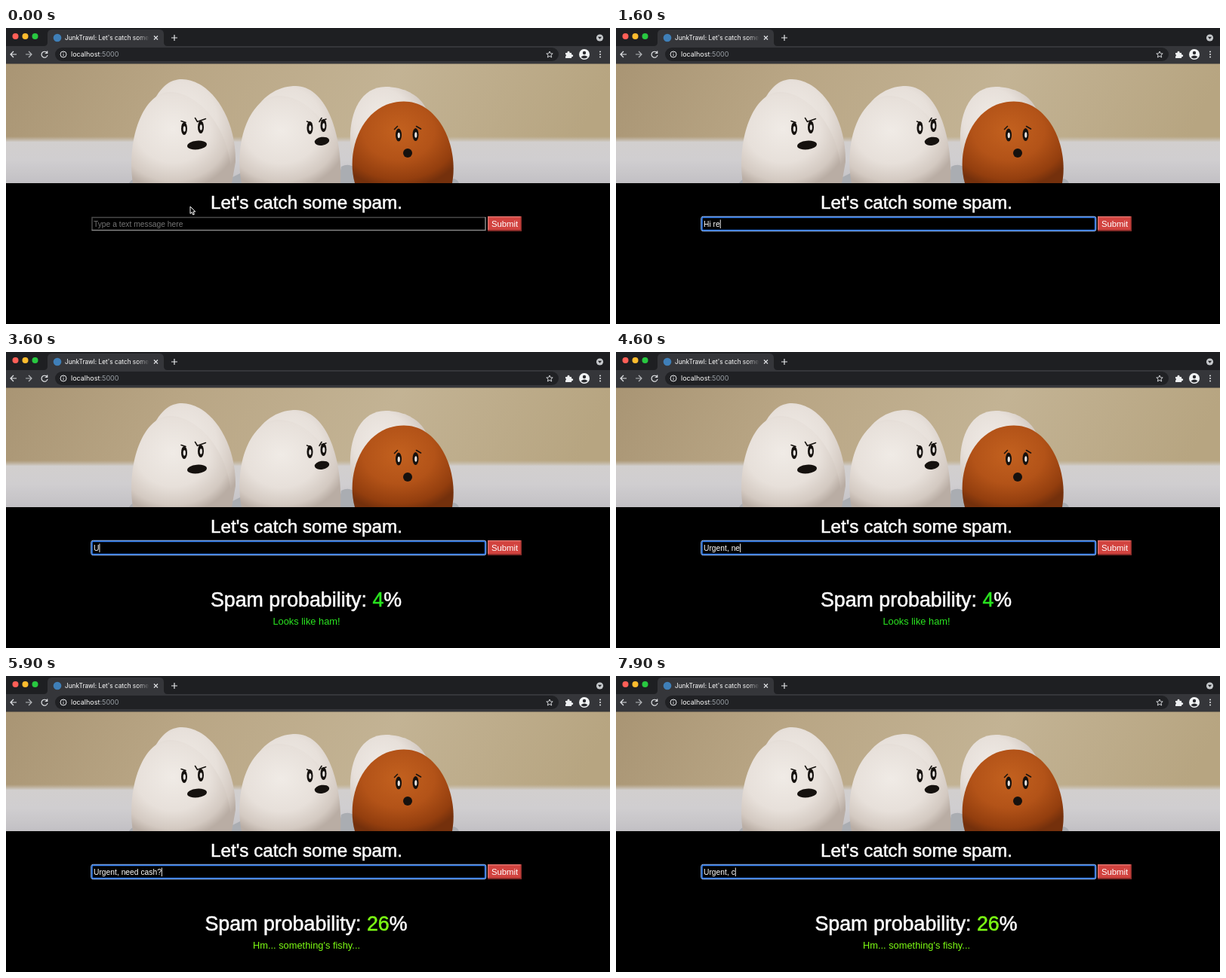
An HTML page that plays this animation: 800x393 px, repeating every 8 s.

```html
<!DOCTYPE html>
<html lang="en">
<head>
<meta charset="utf-8">
<title>Spam check</title>
<style>
  html, body { margin: 0; width: 100%; height: 100%; overflow: hidden; background: #000; }
  svg { display: block; width: 800px; height: 393px; }
  text { font-family: "Liberation Sans", Arial, sans-serif; fill: #fff; white-space: pre; }
  .ui { font-family: Inter, Roboto, sans-serif; }
  .mid { text-anchor: middle; }
  .head { stroke: #fff; stroke-width: .55; }
  .field { font-size: 10.3px; }
  .icon { fill: none; stroke: #e3e5e8; stroke-width: 1.2; }
  .brow { fill: none; stroke: #17130f; stroke-width: 1.5; stroke-linecap: round; }
</style>
</head>
<body>
<svg viewBox="0 0 800 393">
  <defs>
    <linearGradient id="wall" x1="0" x2="1" y1="0" y2=".1">
      <stop stop-color="#a99574"/><stop offset=".3" stop-color="#b9a685"/>
      <stop offset=".65" stop-color="#c3b394"/><stop offset="1" stop-color="#b7a581"/>
    </linearGradient>
    <linearGradient id="table" x2="0" y2="1">
      <stop stop-color="#cdc6bd" stop-opacity="0"/><stop offset=".12" stop-color="#d2cfce"/>
      <stop offset=".5" stop-color="#d0ced0"/><stop offset="1" stop-color="#c2c0c4"/>
    </linearGradient>
    <radialGradient id="white" cx=".42" cy=".4" r=".68">
      <stop stop-color="#f0ebe6"/><stop offset=".55" stop-color="#e7e0da"/>
      <stop offset=".85" stop-color="#d3c9c1"/><stop offset="1" stop-color="#b9ada4"/>
    </radialGradient>
    <radialGradient id="brown" cx=".46" cy=".36" r=".7">
      <stop stop-color="#c3611f"/><stop offset=".5" stop-color="#b35318"/>
      <stop offset=".85" stop-color="#933e0e"/><stop offset="1" stop-color="#74300c"/>
    </radialGradient>
    <linearGradient id="fade" gradientUnits="userSpaceOnUse" x1="174" x2="190">
      <stop stop-color="#fff"/><stop offset="1" stop-color="#fff" stop-opacity="0"/>
    </linearGradient>
  </defs>

  <!-- browser bar -->
  <rect width="800" height="48" fill="#1e1f22"/>
  <path d="M0 24H50Q55 24 55 19V8Q55 2 61 2H203Q209 2 209 8V19Q209 24 214 24H800V47.5H0Z" fill="#35363a"/>
  <circle cx="12.5" cy="11" r="4" fill="#ff5f57"/>
  <circle cx="25.5" cy="11" r="4" fill="#febc2e"/>
  <circle cx="38.5" cy="11" r="4" fill="#28c840"/>
  <circle cx="68" cy="13" r="5.3" fill="#3f7fb8"/>
  <text class="ui" x="78" y="16" font-size="8.25" style="fill:url(#fade)">JunkTrawl: Let's catch some</text>
  <path class="icon" d="M196 10.5l5 5m0-5l-5 5M219 13h8m-4-4v8"/>
  <circle cx="786.5" cy="13" r="4.6" fill="#c4c7ca"/>
  <path d="M784 11.8h5l-2.5 3z" fill="#202124"/>
  <path class="icon" d="M14 35H6m4-4l-4 4 4 4"/>
  <path class="icon" d="M26 35h8m-4-4l4 4-4 4" style="stroke:#b4b7ba"/>
  <path class="icon" d="M54 32.5A4 4 0 1 0 55 36M54.7 30.5v3h-3"/>
  <rect x="65" y="26" width="667" height="18" rx="9" fill="#202124"/>
  <circle class="icon" cx="76" cy="35" r="4" style="stroke-width:1"/>
  <path class="icon" d="M76 34.5v2.7M76 32.4v1" style="stroke-width:1"/>
  <text class="ui" x="86" y="38.2" font-size="9">localhost<tspan fill="#9aa0a6">:5000</tspan></text>
  <path class="icon" style="stroke-width:.9" d="M720 31l1.2 2.8 3 .2-2.3 2 .8 3-2.7-1.6-2.7 1.6.8-3-2.3-2 3-.2z"/>
  <path d="M741 33h2.5a1.6 1.6 0 1 1 3 0h2.500v2.300a1.600 1.600 0 1 1 0 3v1.700h-8v-2.300a1.500 1.500 0 0 0 0-2.800z" fill="#eef0f2"/>
  <circle cx="766" cy="35" r="7" fill="#f1f3f4"/>
  <circle cx="766" cy="33" r="2.200" fill="#2a2b2f"/>
  <path d="M761.500 38.500Q766 34.500 770.500 38.500Q766 42.500 761.500 38.500" fill="#2a2b2f"/>
  <g fill="#e3e5e8"><circle cx="787" cy="31.500" r="1"/><circle cx="787" cy="35" r="1"/><circle cx="787" cy="38.500" r="1"/></g>

  <!-- egg picture -->
  <rect y="47.500" width="800" height="159" fill="url(#wall)"/>
  <rect y="144" width="800" height="62.500" fill="url(#table)"/>
  <path d="M163 206q4-8 20-8H300l14-7 6 15zM440 206l4-22q12-6 20 4l8 18zM585 206l8-6q5 1 7 6z" fill="#aaadb2"/>
  <g fill="url(#white)">
    <path d="M190 110C202 78 217 68 233 68C270 68 305 118 304 178L299 206H185Z"/>
    <path d="M326 115C342 86 364 77 384 77C420 77 446 132 443 206H330Z"/>
    <path d="M464 188C447 150 455 78 503 78C528 78 548 90 556 106L520 188Z"/>
    <path d="M168 206C159 148 182 85 217 85C260 85 304 146 297 206Z"/>
    <path d="M312 206C301 150 324 90 361 90C406 90 448 148 441 206Z"/>
  </g>
  <path d="M462 206C449 160 474 97.500 527 97.500C572 97.500 600 155 591 206Z" fill="url(#brown)"/>
  <g id="eyes"></g>
  <g fill="#15110e">
    <ellipse cx="253" cy="155.500" rx="13" ry="5.800" transform="rotate(-5 253 155.500)"/>
    <ellipse cx="418.500" cy="150.300" rx="9.800" ry="5.500" transform="rotate(-9 418.500 150.300)"/>
    <circle cx="532" cy="166" r="6"/>
  </g>
  <path class="brow" d="M232 123.500l6 2M250.500 119.500l3 5M254.500 124l10-3.500M398.500 124l6 2.500M415 124.500l3-5M418 123l6-2M514.500 134.500l4-4M543.500 130.500l6 3.500"/>
  <rect y="206" width="800" height="187" fill="#000"/>

  <!-- page -->
  <text class="head mid" x="398" y="240" font-size="24.250">Let's catch some spam.</text>
  <g id="plain" fill="none" stroke-width="1.500">
    <path d="M114 268.500V251.500H635" stroke="#4a4a4a"/>
    <path d="M113.500 268.500H635V251" stroke="#858585"/>
  </g>
  <g id="ring" fill="none">
    <rect x="112.800" y="250.300" width="523" height="19.400" rx="2.500" stroke="#a9cbff"/>
    <rect x="114" y="251.500" width="520.600" height="17" rx="1.500" stroke="#2f7df2" stroke-width="1.500"/>
  </g>
  <text class="field" id="value" x="116" y="264"></text>
  <rect id="caret" y="254.500" width="1" height="11.500" fill="#e8e8e8"/>
  <rect x="638" y="250" width="45" height="19.500" fill="#d2433f"/>
  <path d="M638.700 269V250.700H683" fill="none" stroke="#e0706b" stroke-width="1.400"/>
  <path d="M638 268.800H682.300V250" fill="none" stroke="#8c2d2a" stroke-width="1.400"/>
  <text class="mid" x="660.500" y="264" font-size="11.300">Submit</text>
  <g id="result">
    <text class="head mid" x="397.500" y="338" font-size="26.800">Spam probability: <tspan id="score"></tspan>%</text>
    <text class="mid" id="verdict" x="398" y="362" font-size="12.850"></text>
  </g>
  <g id="mouse" stroke="#fff" stroke-linejoin="round">
    <path id="arrow" d="M0 0V9.500L2.200 7.500 3.800 11 5.400 10.300 3.900 6.900H6.800Z" fill="#000"/>
    <path id="beam" d="M-2-5Q0-5 0-4V4Q0 5-2 5M2-5Q0-5 0-4M0 4Q0 5 2 5" fill="none"/>
  </g>
</svg>
<script>
const $ = id => document.getElementById(id);
const show = (id, on) => $(id).setAttribute('visibility', on ? 'visible' : 'hidden');

$('eyes').innerHTML = [[236, 133.5], [258, 131.5], [402.5, 132.5], [420.5, 129.5], [520, 142], [542.5, 141.5]]
  .map(([x, y]) => `<ellipse cx="${x}" cy="${y}" rx="4" ry="8.6" fill="#15110e"/>
    <ellipse cx="${x + .3}" cy="${y + .5}" rx="1.6" ry="3.8" fill="#e9e5e1"/>`).join('');

const FOCUS = 420, LOOP = 8000;
const keys = [[FOCUS, '']];   // [time, field text]; every key restarts the caret blink
const type = (before, text, start, step) => {
  for (let i = 1; i <= text.length; i++) keys.push([start + (i - 1) * step, before + text.slice(0, i)]);
};
const erase = (text, count, start, step) => {
  for (let i = 1; i <= count; i++) keys.push([start + (i - 1) * step, text.slice(0, -i)]);
};
const first = 'Hi readers!', second = 'Urgent, need cash?';
type('', first, 1200, 100);
keys.push([2500, first]);
erase(first, first.length, 2800, 60);
type('', 'U', 3600, 0);
type('U', second.slice(1), 3750, 100);
keys.push([5550, second]);
erase(second, 10, 6450, 100);
type('Urgent, ', 'c', 7750, 0);

const path = [[100, 244, 237], [350, 252, 258], [450, 252, 258], [800, 433, 361]];
function mouseAt(t) {
  const i = path.findIndex(p => p[0] > t);
  if (i === 0) return path[0].slice(1);
  if (i < 0) return path.at(-1).slice(1);
  const [t0, x0, y0] = path[i - 1], [t1, x1, y1] = path[i];
  const u = (t - t0) / (t1 - t0), e = u * u * (3 - 2 * u);
  return [x0 + (x1 - x0) * e, y0 + (y1 - y0) * e];
}

function draw(t) {
  const focused = t >= FOCUS;
  const [since, text] = keys.findLast(k => k[0] <= t) || [0, ''];
  const value = $('value');
  value.textContent = text || 'Type a text message here';
  value.style.fill = text ? '#fff' : '#757575';
  show('plain', !focused);
  show('ring', focused);
  $('caret').setAttribute('x', 116 + (text ? value.getComputedTextLength() : 0));
  show('caret', focused && (t - since) % 1000 < 500);

  const fishy = t >= 5700, color = fishy ? '#7dfc14' : '#2ae620';
  show('result', t >= 2700);
  $('score').textContent = fishy ? '26' : '4';
  $('score').style.cssText = `fill:${color};stroke:${color}`;
  $('verdict').textContent = fishy ? "Hm... something's fishy..." : 'Looks like ham!';
  $('verdict').style.fill = color;

  const [x, y] = mouseAt(t), moving = t < 1200, over = y > 251 && y < 269;
  $('mouse').setAttribute('transform', `translate(${x} ${y})`);
  show('arrow', moving && !over);
  show('beam', moving && over);
}

function tick() {
  draw(Math.floor(performance.now() % LOOP / 100) * 100);
  requestAnimationFrame(tick);
}
tick();
</script>
</body>
</html>
```
